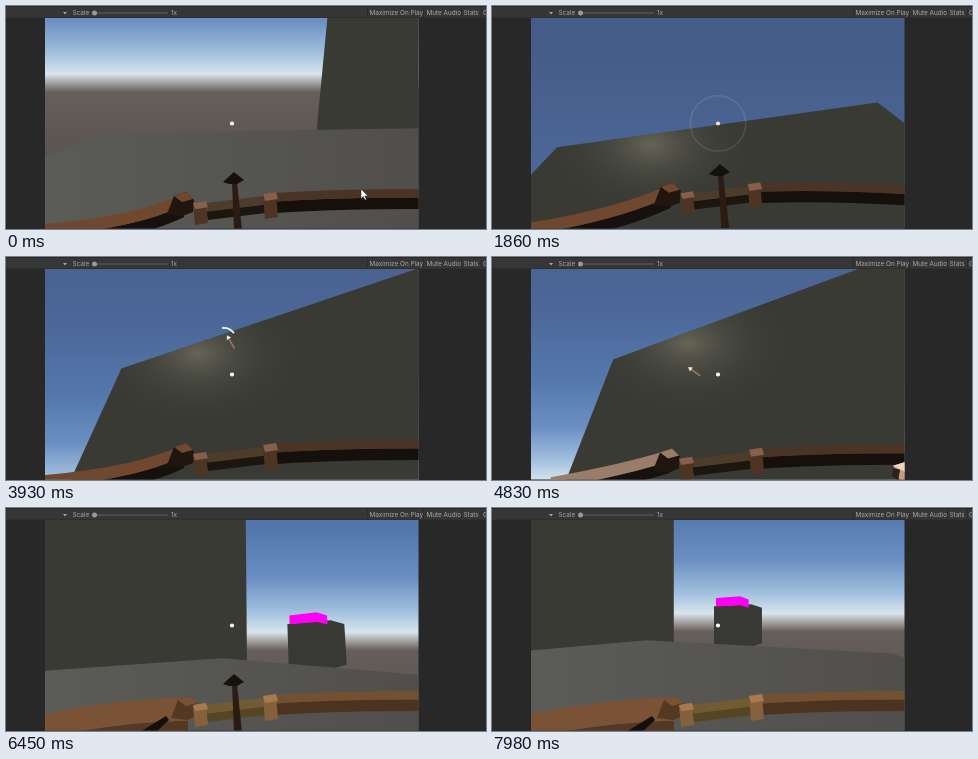
Recreate the animation shown at these times as an HTML page. Size 480x223 px, loop 8000 ms.

```html
<!DOCTYPE html>
<html>
<head>
<meta charset="utf-8">
<style>
html, body { margin: 0; width: 100%; height: 100%; overflow: hidden; background: #282828; }
svg { display: block; width: 480px; height: 223px; }
text { font: 6.4px Inter, sans-serif; fill: #a8a8a8; }
</style>
</head>
<body>
<svg viewBox="0 0 480 223">
  <defs>
    <clipPath id="view"><rect x="39" y="12" width="373.500" height="210.500"/></clipPath>
    <linearGradient id="sky" gradientUnits="userSpaceOnUse" x1="0" y1="-300" x2="0" y2="0">
      <stop offset="0" stop-color="#465d89"/>
      <stop offset=".4" stop-color="#4c6899"/>
      <stop offset=".63" stop-color="#5578ad"/>
      <stop offset=".78" stop-color="#6b8fc2"/>
      <stop offset=".89" stop-color="#a0bfde"/>
      <stop offset=".96" stop-color="#d8e5ec"/>
      <stop offset="1" stop-color="#8f8a88"/>
    </linearGradient>
    <linearGradient id="soil" gradientUnits="userSpaceOnUse" x1="0" y1="0" x2="0" y2="90">
      <stop offset="0" stop-color="#8f8a88"/>
      <stop offset=".07" stop-color="#665e5a"/>
      <stop offset="1" stop-color="#58504d"/>
    </linearGradient>
    <linearGradient id="stone" gradientUnits="userSpaceOnUse" x1="39" y1="0" x2="413" y2="0">
      <stop offset="0" stop-color="#5b5b57"/>
      <stop offset="1" stop-color="#504f4b"/>
    </linearGradient>
    <radialGradient id="shine">
      <stop offset="0" stop-color="#84816e" stop-opacity=".6"/>
      <stop offset=".35" stop-color="#67665a" stop-opacity=".35"/>
      <stop offset="1" stop-color="#3a3a34" stop-opacity="0"/>
    </radialGradient>
    <clipPath id="wallClip"><path id="wallCut"/></clipPath>
  </defs>

  <rect width="480" height="223" fill="#282828"/>
  <rect y="1" width="480" height="10.500" fill="#363636"/>
  <path d="M361.500 1V11.500M417.500 1V11.500M455.500 1V11.500M475.500 1V11.500" stroke="#2c2c2c"/>
  <path d="M57 6h4l-2 2.400z" fill="#a8a8a8"/>
  <text x="66.500" y="9.300">Scale</text>
  <path d="M88 7H162" stroke="#606060"/>
  <circle cx="88.500" cy="7" r="2.500" fill="#999"/>
  <text x="165" y="9.300">1x</text>
  <text x="363.500" y="9.300">Maximize On Play</text>
  <text x="420.500" y="9.300">Mute Audio</text>
  <text x="457.500" y="9.300">Stats</text>
  <text x="477" y="9.300">G</text>

  <g clip-path="url(#view)">
    <g id="backdrop">
      <rect x="39" y="-700" width="374" height="701" fill="url(#sky)"/>
      <rect x="39" width="374" height="500" fill="url(#soil)"/>
    </g>
    <path id="shade" fill="#242422"/>
    <path id="cube" fill="#383934"/>
    <path id="cap" fill="#ff00f4"/>
    <path id="wall" fill="#393a34"/>
    <g clip-path="url(#wallClip)"><ellipse id="glow" rx="105" ry="70" fill="url(#shine)"/></g>
    <path id="floor" fill="url(#stone)"/>
    <g id="flight">
      <path id="trail" d="M-6 -9Q1 -10 6 -4" fill="none" stroke="#e6f4f4" stroke-width="1.800"/>
      <g id="dart">
        <path d="M0 0H13" stroke="#9c7a58" stroke-width="1.500"/>
        <path d="M-2 0L2-2.500V2.500z" fill="#f2ece2"/>
      </g>
    </g>
    <circle id="ring" cx="226" cy="117.500" fill="none" stroke="#fff" stroke-opacity=".11" stroke-width="1.500"/>
    <circle id="dot" cx="226" cy="117.500" r="2.100"/>
    <g id="bow">
      <path id="armLow"/><path id="armTop"/>
      <path id="fist"/><path id="knuckle"/>
      <path id="notch" d="M134 224L160 208 163 212 150 224z" fill="#140f0b"/>
      <path id="limbLow"/><path id="limbTop"/>
      <path id="gripLow"/><path id="gripTop"/>
      <path id="band1"/><path id="band2"/><path id="lip1"/><path id="lip2"/>
      <g id="nock">
        <path id="shaft" fill="#2c1b14"/>
        <path id="head" d="M-11 10L0 0 10 8 3 12H-5z" fill="#17110e"/>
      </g>
    </g>
    <g id="pull">
      <path d="M213 224L215 213 227 209 233 218 240 200 249 199 252 210 262 214V224z" fill="#38241b"/>
      <path d="M215 213L227 209 230 219 218 222zM241 200L249 199 250 208 242 212z" fill="#87593f"/>
    </g>
    <g id="hand">
      <path d="M300 142L330 134 414 164V188L372 163 330 152z" fill="#3a3732"/>
      <path d="M296 143L330 151 372 163 414 187" fill="none" stroke="#dcdcd5" stroke-width="2"/>
      <path d="M310 115L344 125 414 140V166L372 153 300 138z" fill="#9a6a50"/>
      <path d="M276 92L289 88 299 95 306 112 322 122 326 138 296 143 281 136 270 123V113L283 107z" fill="#c69a7d"/>
      <path d="M276 94L283 96 281 107 275 102z" fill="#29221f"/>
      <path d="M276 92L289 88 299 95 290 99zM270 113L280 109 288 115 282 124zM300 124L306 112 321 122 314 132z" fill="#efd3bd"/>
      <path d="M282 124L288 115 300 124 296 136zM314 132L344 125 338 138 300 141z" fill="#936650"/>
    </g>
  </g>
  <path id="cursor" d="M0 0V9.500L2.300 7.500 3.900 11 5.400 10.300 3.800 7H6.800z" fill="#fff" stroke="#222" stroke-width=".5"/>
</svg>
<script>
const $ = id => document.getElementById(id);
const set = (id, o) => { for (const k in o) $(id).setAttribute(k, o[k]); };
const show = (id, on) => set(id, { visibility: on ? 'visible' : 'hidden' });
const clamp = x => Math.max(0, Math.min(1, x));
const ramp = (a, b, t) => clamp((t - a) / (b - a));
const step = (a, b, t) => { const x = ramp(a, b, t); return x * x * (3 - 2 * x); };
const lerp = (a, b, f) => a + (b - a) * f;
const mix = (a, b, f) => a.map((v, i) => lerp(v, b[i], f));
const rgb = h => [1, 3, 5].map(i => parseInt(h.substr(i, 2), 16));
const tint = (a, b, f) => `rgb(${mix(rgb(a), rgb(b), f).map(Math.round)})`;

// rows: [time, value...]
function track(rows, t) {
  let i = 0;
  while (i < rows.length - 2 && t >= rows[i + 1][0]) i++;
  return mix(rows[i], rows[i + 1], ramp(rows[i][0], rows[i + 1][0], t)).slice(1);
}

// time, yaw, pitch in degrees; the eye stays at the world's centre
const camera = [[0, -86.3, -11.6], [1120, -86.3, -11.6], [1860, -10.1, 52],
  [2730, -15.7, 41.3], [3570, -23.3, 36.3], [4430, -23.3, 36.3], [5570, -28.4, 26.6],
  [5750, -27, 26], [6450, 44.2, 5.8], [7520, 58, 1.5], [7700, 58, 1.5], [7980, 62.4, 0]];
const FOCAL = 183, CX = 226, CY = 117.5, RAD = Math.PI / 180;
let yaw = 0, pitch = 0;

function toEye([x, y, z]) {
  const fwd = x * Math.sin(yaw) + z * Math.cos(yaw);
  return [x * Math.cos(yaw) - z * Math.sin(yaw),
    y * Math.cos(pitch) - fwd * Math.sin(pitch),
    fwd * Math.cos(pitch) + y * Math.sin(pitch)];
}
const toScreen = ([x, y, z]) => [CX + FOCAL * x / z, CY - FOCAL * y / z];

// projects a face, cut at the near plane
function face(pts) {
  const near = 0.2, out = [], eye = pts.map(toEye);
  eye.forEach((a, i) => {
    const b = eye[(i + 1) % eye.length];
    if (a[2] > near) out.push(a);
    if ((a[2] > near) != (b[2] > near)) out.push(mix(a, b, (near - a[2]) / (b[2] - a[2])));
  });
  if (!out.length) return '';
  return 'M' + out.map(p => toScreen(p).map(v => v.toFixed(2)).join(' ')).join('L') + 'z';
}
const flat = (x0, x1, y, z0, z1) => face([[x0, y, z0], [x1, y, z0], [x1, y, z1], [x0, y, z1]]);
const upright = (x0, z0, x1, z1, y0, y1) => face([[x0, y0, z0], [x1, y0, z1], [x1, y1, z1], [x0, y1, z0]]);

// the faces of a block that can be seen from the eye
function block(x, z, r, y0, y1) {
  const side = upright(x - r, z - r, x - r, z + r, y0, y1) + upright(x - r, z - r, x + r, z - r, y0, y1);
  return side;
}

function drawWorld(t) {
  [yaw, pitch] = track(camera, t).map(v => v * RAD);
  set('backdrop', { transform: `translate(0 ${CY + FOCAL * Math.tan(pitch)})` });
  const wall = upright(-18.2, 10.15, 11.6, 10.15, -6, 13);
  set('wall', { d: wall });
  set('wallCut', { d: wall });
  set('floor', { d: flat(-4, 8.7, -1, -2.5, 10) });
  set('cube', { d: block(18.7, 7.2, 2, -2, 2) });
  set('cap', { d: block(18.4, 7.8, 1.35, 2, 2.9) });
  set('shade', { d: flat(17.7, 21.7, -3.3, 6.6, 10.6) });
  const spot = toEye([-7.8, 11.5, 10.15]);
  show('glow', spot[2] > 1);
  if (spot[2] > 1) {
    const [cx, cy] = toScreen(spot);
    set('glow', { cx, cy });
  }
}

// a strip of a curved limb, from share a to share b of its width
function ribbon([x0, y0, cx, cy, x1, y1, w], a, b) {
  const p = w * a, q = w * b;
  return `M${x0} ${y0 + p}Q${cx} ${cy + p} ${x1} ${y1 + p}V${y1 + q}Q${cx} ${cy + q} ${x0} ${y0 + q}z`;
}
const slab = ([x, y, w, h], rise, a = 0, b = 1) =>
  `M${x} ${y + h * a}l${w} ${-rise} 2 ${h * (b - a)} ${-w} ${rise}z`;

// x0, y0, bend x, bend y, x1, y1, width
const arms = {
  rest: [39, 218, 132, 210, 178, 187, 24],
  drawn: [39, 211, 115, 172, 182, 143, 24],
  glow: [92, 211, 130, 190, 178, 189, 22],
  wide: [39, 206, 110, 191, 182, 189, 38]
};

function drawBow(t, d, lit, wide) {
  const white = lit * (1 - wide);
  set('bow', { transform: `translate(0 ${13 * white})` });

  let arm = mix(mix(arms.rest, arms.glow, lit), arms.wide, wide);
  arm = mix(arm, arms.drawn, d);
  const split = 0.5 + 0.12 * wide;
  const skin = white > 0 ? tint('#70482f', '#e0d6cc', white) : tint('#70482f', '#7a5235', wide);
  set('armTop', { d: ribbon(arm, 0, split), fill: skin });
  set('armLow', { d: ribbon(arm, split, 1), fill: tint('#17110d', '#543824', wide) });
  const [x, y] = arm.slice(4);
  set('fist', { d: `M${x - 10} ${y + 3}l12 -4 8 8 -1 12 -10 4 -16 -2z`, fill: tint('#21160f', '#553822', wide) });
  set('knuckle', { d: `M${x - 10} ${y + 3}l12 -4 7 7 -11 3z`, fill: skin });
  set('notch', { opacity: wide });

  const limb = mix([270, 187, 330, 183, 414, 183, 20], [262, 142, 330, 146, 414, 168, 17], d);
  set('limbTop', { d: ribbon(limb, 0, 0.42), fill: tint('#4c3425', '#73502f', wide) });
  set('limbLow', { d: ribbon(limb, 0.42, 1), fill: tint('#15100c', '#4c331f', wide) });

  const grip = mix([200, 197, 58, 17], [203, 150, 48, 14], d);
  set('gripTop', { d: slab(grip, 7, 0, 0.5), fill: tint('#4c3c29', '#715b33', wide) });
  set('gripLow', { d: slab(grip, 7, 0.5, 1), fill: tint('#1b1610', '#554522', wide) });
  const bands = [mix([187, 197, 13, 22], [194, 150, 9, 16], d), mix([257, 188, 13, 25], [250, 142, 11, 18], d)];
  bands.forEach((b, i) => {
    set('band' + (i + 1), { d: slab(b, 2), fill: tint('#4e3423', '#85603d', wide) });
    set('lip' + (i + 1), { d: slab(b, 2, 0, 0.28), fill: tint('#86604a', '#a8784f', wide) });
  });

  const tip = 166 - 38 * d;
  set('head', { transform: `translate(228 ${tip})` });
  set('shaft', { d: `M226 ${tip + 10}h5L${236 + 6 * d} ${224 - 8 * d}h-8z` });
  show('nock', t < 2800 || (t >= 6200 && t < 7000));
  set('pull', { transform: `translate(0 ${40 * (1 - step(0.3, 1, d))})` });
}

const flight = [[2800, 227, 128], [3400, 211, 78], [3930, 222, 80],
  [4410, 193, 120], [5570, 206, 96], [5750, 207, 95], [6030, 278, 104]];

function drawFlight(t) {
  const p = track(flight, t);
  const on = t >= 2800 && t < 6030;
  set('flight', { transform: `translate(${p})` });
  set('dart', { transform: `rotate(${lerp(60, 36, step(3930, 4410, t))})` });
  show('flight', on);
  show('trail', on && t < 4410);
}

function drawAim(t) {
  const r = t < 4000 ? 34 * (2350 - t) / 600 : 34 * (6950 - t) / 350;
  const aiming = r > 0 && r <= 34;
  const full = (t >= 2350 && t < 2800) || (t >= 6950 && t < 7000);
  if (aiming) set('ring', { r });
  show('ring', aiming);
  set('dot', { fill: full ? '#8eb4f2' : aiming ? '#f8dcd4' : '#fff' });
}

function draw(t) {
  drawWorld(t);
  const first = (0.21 * step(1600, 1860, t) + 0.79 * step(1860, 2550, t)) * (1 - step(2800, 2960, t));
  const second = step(6550, 6950, t) * (1 - step(7000, 7130, t));
  drawBow(t, first + second, step(4500, 5300, t), step(5750, 6300, t));
  drawFlight(t);
  drawAim(t);

  const away = 1 - step(4650, 5350, t) * (1 - step(6030, 6300, t));
  set('hand', { transform: `translate(${150 * away} ${140 * away})` });
  const c = step(30, 330, t);
  set('cursor', { transform: `translate(${355 + 130 * c} ${183 - 18 * c})` });
}

function loop() {
  draw(performance.now() % 8000);
  requestAnimationFrame(loop);
}
loop();
</script>
</body>
</html>
```
